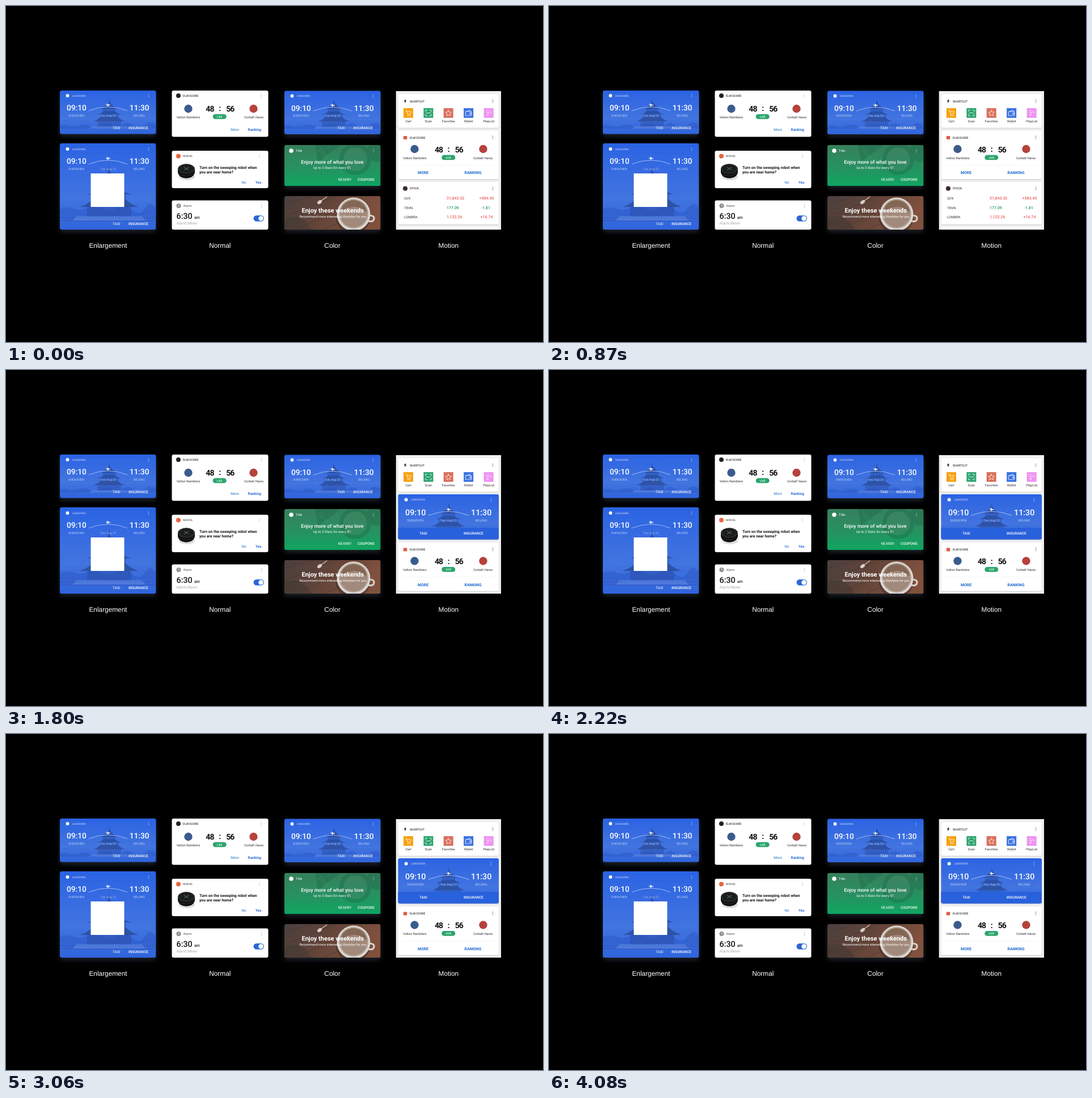
An HTML page for the animation above (4.29 s loop, 947x592 px).

```html
<!DOCTYPE html>
<html lang="en">
<head>
<meta charset="utf-8">
<title>Card styles</title>
<style>
html, body { margin: 0; width: 100%; height: 100%; overflow: hidden; background: #000; }
svg { display: block; width: 947px; height: 592px; text-rendering: geometricPrecision; }
text { font-family: Roboto, Arial, sans-serif; font-size: 5.7px; fill: #333; }
.w text, text.w { fill: #fff; }
.m { text-anchor: middle; }
.e { text-anchor: end; }
.med { font-weight: 500; }
text.b { font-weight: 700; }
text.head { font-size: 5.1px; font-weight: 500; }
text.time { font-size: 13.7px; font-weight: 500; }
text.btn { font-size: 6.4px; }
text.link { font-size: 6.4px; fill: #2a6cd6; }
text.big { font-size: 6.9px; font-weight: 700; fill: #1f6bd0; }
text.num { font-size: 7px; font-weight: 500; }
text.up { fill: #ea5f5a; }
text.down { fill: #2a9d63; }
text.score { font-size: 14px; font-weight: 700; letter-spacing: -1px; fill: #111; }
text.cap { font: 11.85px "Liberation Sans", Arial, sans-serif; fill: #fff; }
text.soft { font-size: 5.4px; fill: #b9cdfa; }
.line { fill: none; stroke: #fff; stroke-width: .8; stroke-linejoin: round; stroke-linecap: round; }
.card { fill: #fff; }
</style>
</head>
<body>
<svg viewBox="0 0 947 592">
<defs>
  <linearGradient id="green" x2="0" y2="1">
    <stop offset="0" stop-color="#35805c"/><stop offset=".5" stop-color="#2a8f61"/><stop offset="1" stop-color="#0fa560"/>
  </linearGradient>
  <linearGradient id="wood" x2="1" y2=".25">
    <stop offset="0" stop-color="#4b403d"/><stop offset=".5" stop-color="#634439"/><stop offset="1" stop-color="#80513e"/>
  </linearGradient>
  <linearGradient id="sky" x2="0" y2="1">
    <stop offset="0" stop-color="#2b63e3"/><stop offset=".65" stop-color="#4274df"/><stop offset="1" stop-color="#2f64dc"/>
  </linearGradient>
  <filter id="glow" x="-10%" y="-10%" width="120%" height="130%">
    <feDropShadow dx="0" dy="4" stdDeviation="4" flood-color="#343a48" flood-opacity=".6"/>
  </filter>
  <filter id="lift" x="-10%" y="-10%" width="120%" height="130%">
    <feDropShadow dx="0" dy="1" stdDeviation="1.3" flood-color="#445" flood-opacity=".25"/>
  </filter>
  <filter id="smear" x="-5%" y="-10%" width="110%" height="120%">
    <feGaussianBlur id="smearBlur" stdDeviation="0"/>
  </filter>
  <clipPath id="panel"><rect x="687.5" y="150" width="185.5" height="244"/></clipPath>
  <clipPath id="coffeeClip"><rect x="491" y="335" width="169.5" height="59" rx="3"/></clipPath>
  <clipPath id="greenClip"><rect x="491" y="245" width="169.5" height="72" rx="3"/></clipPath>
  <clipPath id="tallClip"><rect width="169.5" height="152" rx="3"/></clipPath>

  <g id="dots"><circle cy="-2.4" r=".7"/><circle r=".7"/><circle cy="2.4" r=".7"/></g>

  <g id="temple">
    <path d="M52 67l4-4h62l4 4z" fill="#8ba8ec" opacity=".3"/>
    <path d="M76 32h22v4H76zM71 42h32v4H71zM66 54h42v9H66z" fill="#27489b" opacity=".4"/>
    <path d="M87 15l1 6 3 3q3 5 11 8H72q8-3 11-8l3-3zM77 36h20q3 4 11 6H66q8-2 11-6zM72 46h30q4 5 13 8H59q9-3 13-8z" fill="#233f86" opacity=".62"/>
  </g>

  <g id="trip" class="w">
    <circle cx="13.5" cy="9" r="2.9" fill="#fff"/>
    <text x="22" y="10.8" style="font-size:4.6px" opacity=".8">LUNADORA</text>
    <use href="#dots" x="156.5" y="9" fill="#b9cdfa"/>
    <path d="M51 35.5Q85 22 119 35.5" fill="none" stroke="#b9cdfa" stroke-width=".8"/>
    <path d="M81 25.300l.3-1.300 1.200.8h1.500l-.6-2.300h.8l1.700 2.300h1.800q1.300.2 1.300.8t-1.300.7h-1.800l-1.700 2.200h-.8l.6-2.200z" fill="#fff"/>
    <text x="12" y="35.2" class="time">09:10</text>
    <text x="157.5" y="35.2" class="time e">11:30</text>
    <text x="15" y="45.6" class="soft">SHENZHEN</text>
    <text x="85" y="45.6" class="soft m" opacity=".75">Tue, Aug 22</text>
    <text x="150" y="45.6" class="soft e">BEIJING</text>
  </g>
  <g id="tripButtons" class="w">
    <text x="93" class="btn">TAXI</text>
    <text x="121" class="btn med">INSURANCE</text>
  </g>
  <path id="trees" fill="#2a58c0" opacity=".45" d="M0 62q8-3 16 0t18-1 18 1 20-1 20 1 18-1 20 1 20-1 19.500 0v6H0z"/>
  <g id="tripCard">
    <rect width="169.5" height="76.5" rx="3" fill="url(#sky)"/>
    <use href="#trees"/>
    <use href="#temple"/>
    <use href="#trip"/>
    <use href="#tripButtons" y="67.600"/>
  </g>

  <g id="result">
    <text x="-17.300" y="4.900" class="score m">48</text>
    <text y="4" class="score m">:</text>
    <text x="18.500" y="4.900" class="score m">56</text>
    <rect x="-12" y="9.500" width="24" height="8.800" rx="4.400" fill="#2ba56b"/>
    <text y="15.600" class="w m med" style="font-size:4.800px">LIVE</text>
  </g>
  <circle id="home" r="7.200" fill="#3b5b8c"/>
  <circle id="away" r="7.200" fill="#b5423b"/>
</defs>

<!-- Enlargement -->
<g transform="translate(95 149)" filter="url(#glow)"><use href="#tripCard"/></g>
<g transform="translate(95 242)" filter="url(#glow)">
  <g clip-path="url(#tallClip)">
    <rect width="169.5" height="152" fill="url(#sky)"/>
    <path d="M0 116q12-6 24-1t26-2 26 2 24-2 26 3 24-2 20 2v22H0z" fill="#2a58c0" opacity=".45"/>
    <use href="#temple" transform="translate(-74 12) scale(1.85)"/>
    <path d="M0 128h170M0 134h170" stroke="#7f9fe8" stroke-width=".7" stroke-dasharray="2 3" opacity=".6"/>
  </g>
  <use href="#trip" y="1"/>
  <rect x="54.500" y="53" width="59" height="59" fill="#fff"/>
  <use href="#tripButtons" y="143.700"/>
</g>

<!-- Normal -->
<rect class="card" x="292.5" y="149" width="170" height="81.5" rx="3"/>
<circle cx="304" cy="158" r="4" fill="#222"/>
<text x="312" y="159.800" class="head">ELM SCORE</text>
<use href="#dots" x="450.5" y="158" fill="#aaa"/>
<use href="#home" x="321.5" y="181"/>
<use href="#away" x="436.5" y="181"/>
<use href="#result" x="376.7" y="181"/>
<text x="321.500" y="197.500" class="m">Velton Ramblers</text>
<text x="437" y="197.500" class="m">Corbell Hares</text>
<text x="403.500" y="220.300" class="link m">More</text>
<text x="450" y="220.300" class="link b e">Ranking</text>

<rect class="card" x="292.5" y="255" width="170" height="66" rx="3"/>
<circle cx="304" cy="264.500" r="4" fill="#e8663c"/>
<text x="312" y="266.300" style="font-size:4.700px">NORVEL</text>
<use href="#dots" x="447" y="264.5" fill="#aaa"/>
<ellipse cx="319" cy="301" rx="14" ry="6" fill="#ddd"/>
<path d="M303 287v6c2 14 28 14 30 0v-6z" fill="#0e0e0e"/>
<ellipse cx="318" cy="287" rx="15" ry="9" fill="#29292a"/>
<ellipse cx="318" cy="286.500" rx="12" ry="7" fill="#1b1c1d"/>
<path d="M314 284l8 5m0-5l-8 5" stroke="#4e857b" stroke-width=".9"/>
<path d="M304 294q14 11 28 0" fill="none" stroke="#444" stroke-width=".6"/>
<g style="font-weight:700">
  <text x="341" y="287.300" style="font-size:6.800px;fill:#111">Turn on the sweeping robot when</text>
  <text x="341" y="295.300" style="font-size:6.800px;fill:#111">you are near home?</text>
</g>
<text x="419.500" y="313" class="link m">No</text>
<text x="450.500" y="313" class="link b e">Yes</text>

<rect class="card" x="292.5" y="342.500" width="170" height="51.500" rx="3"/>
<circle cx="304.500" cy="352" r="4" fill="#8b8b90"/>
<path d="M304.500 349.500v2.700l1.700 1" class="line"/>
<text x="312.500" y="354" style="fill:#555">Alarm</text>
<use href="#dots" x="450.5" y="352" fill="#aaa"/>
<text x="300.500" y="375.300" style="font-size:14.300px;font-weight:500;fill:#111">6:30</text>
<text x="332" y="375.300" style="font-size:7px;font-weight:500;fill:#222">am</text>
<text x="300.500" y="384.600" style="font-size:6.800px;fill:#a9a9a9">Alarm,Never</text>
<rect x="436.500" y="369" width="18.500" height="10.500" rx="5.250" fill="#2e66d8"/>
<circle cx="449.600" cy="374.250" r="4.300" fill="#fff"/>

<!-- Color -->
<g transform="translate(491 149.500)" filter="url(#glow)"><use href="#tripCard"/></g>

<g filter="url(#glow)">
  <g clip-path="url(#greenClip)">
    <rect x="491" y="245" width="169.5" height="72" fill="url(#green)"/>
    <g fill="#1c5f42" opacity=".3">
      <circle cx="616" cy="270" r="28"/><circle cx="653" cy="257" r="17"/><path d="M545 245h45l-40 30z"/>
    </g>
    <circle cx="616" cy="270" r="21" fill="#57a37d" opacity=".3"/>
    <path d="M551 253l16 18M554 249l14 18" stroke="#6ab893" opacity=".35"/>
  </g>
</g>
<g class="w">
  <circle cx="503" cy="255" r="3.800" fill="#fff"/>
  <text x="511" y="257" style="font-size:5.900px">Title</text>
  <use href="#dots" x="648" y="255" fill="#b4dcc7"/>
  <text x="575.300" y="277.500" class="m med" style="font-size:8.800px">Enjoy more of what you love</text>
  <text x="575" y="286.600" class="m" style="font-size:5.950px">Up to 3 Stars for every $1</text>
  <text x="585.500" y="307.800" class="btn">NEARBY</text>
  <text x="620" y="307.800" class="btn med">COUPONS</text>
</g>

<g filter="url(#glow)">
  <g clip-path="url(#coffeeClip)">
    <rect x="491" y="335" width="169.5" height="59" fill="url(#wood)"/>
    <path d="M491 350l50-15M491 371l90-36M512 394l70-33M560 394l40-18" stroke="#302927" stroke-width="1" opacity=".35"/>
    <path d="M491 374q30-12 48 20h-48z" fill="#39322f" opacity=".4"/>
    <path d="M566 336l-11 8" stroke="#cfc4bb" stroke-width="1.300"/>
    <ellipse cx="553" cy="345.500" rx="4.600" ry="2.900" fill="#d8cec6" transform="rotate(-38 553 345.500)"/>
    <circle cx="612" cy="371" r="31" fill="#3d2c26" opacity=".5"/>
    <path d="M640 369q10 0 9 6t-10 4" fill="none" stroke="#d8d1cc" stroke-width="3"/>
    <circle cx="613" cy="367" r="29.500" fill="#dcd6d1"/>
    <circle cx="613" cy="366" r="26" fill="#b5a598"/>
    <circle cx="613" cy="366" r="24" fill="#a18a7b"/>
    <path d="M590 364a23 22 0 0 1 46 0q-10-11-23-10t-23 10z" fill="#846655"/>
  </g>
</g>
<g class="w m">
  <text x="576.200" y="363.600" class="b" style="font-size:11px">Enjoy these weekends</text>
  <text x="576.500" y="372.800" style="font-size:5.700px">Recommend more interesting lifestyles for you</text>
</g>

<!-- Motion -->
<g clip-path="url(#panel)">
  <rect x="687.500" y="150" width="185.500" height="244" fill="#f1f1f2"/>
  <g filter="url(#lift)"><rect class="card" x="691.5" y="155" width="177.5" height="59.500" rx="3"/></g>
  <path d="M704.800 163.500l-3 4.600h1.900l-.6 3.500 3.200-4.800h-2z" fill="#111"/>
  <text x="712" y="169.500" class="head">SHORTCUT</text>
  <use href="#dots" x="858.5" y="167.5" fill="#555"/>
  <g transform="translate(709.5 188.500)">
    <rect x="-8.500" y="-8.500" width="17" height="17" fill="#f8a010"/>
    <path class="line" d="M-5-4.500h2l2 6.500h4l2-4.500h-7"/><circle cx="-.5" cy="4.500" r=".9" fill="#fff"/><circle cx="3" cy="4.500" r=".9" fill="#fff"/>
    <text y="16.500" class="m">Cart</text>
  </g>
  <g transform="translate(744.900 188.500)">
    <rect x="-8.500" y="-8.500" width="17" height="17" fill="#2da36f"/>
    <path class="line" d="M-5-2v-3h3M2-5h3v3M5 2v3h-3M-2 5h-3v-3M-3.500 0h7"/>
    <text y="16.500" class="m">Scan</text>
  </g>
  <g transform="translate(780.200 188.500)">
    <rect x="-8.500" y="-8.500" width="17" height="17" fill="#d9705c"/>
    <path class="line" d="M0-5l1.500 3.300 3.700.4-2.700 2.500.7 3.600-3.200-1.800-3.200 1.800.7-3.600-2.700-2.500 3.700-.4z"/>
    <text y="16.500" class="m">Favorites</text>
  </g>
  <g transform="translate(815.700 188.500)">
    <rect x="-8.500" y="-8.500" width="17" height="17" fill="#3972e2"/>
    <path class="line" d="M-5-2.500h10v7h-10zM-3.500-2.500l6-2.500 1 2.500M5 0h-3v2h3"/>
    <text y="16.500" class="m">Wallet</text>
  </g>
  <g transform="translate(851.200 188.500)">
    <rect x="-8.500" y="-8.500" width="17" height="17" fill="#ee93f1"/>
    <path class="line" opacity=".7" d="M-5-4h6M-5-1h4M-1 3.500v-4l5-2v4"/><circle cx="-2.300" cy="3.500" r="1.300" class="line" opacity=".7"/>
    <text y="16.500" class="m">PlayList</text>
  </g>

  <g id="list">
    <g filter="url(#lift)">
      <rect class="card" x="691.5" y="219.500" width="177.5" height="85.500" rx="3"/>
      <rect class="card" x="691.5" y="309.500" width="177.5" height="75" rx="3"/>
      <rect class="card" x="691.5" y="389" width="177.5" height="60" rx="3"/>
    </g>
    <rect x="700.800" y="229" width="6.500" height="6" rx="1" fill="#dc5f49"/>
    <text x="712" y="233.700" class="head">ELM SCORE</text>
    <use href="#dots" x="858.5" y="231.700" fill="#555"/>
    <use href="#home" x="720.500" y="252"/>
    <use href="#away" x="841.500" y="252"/>
    <use href="#result" x="780.300" y="253"/>
    <text x="721" y="269.700" class="m">Velton Ramblers</text>
    <text x="841" y="269.700" class="m">Corbell Hares</text>
    <path d="M698 280.500h164" stroke="#efefef" stroke-width=".7"/>
    <text x="735.500" y="296" class="big m">MORE</text>
    <text x="823.500" y="296" class="big m">RANKING</text>

    <circle cx="704" cy="321.500" r="4" fill="#3a2a2c"/>
    <text x="712" y="323.400" class="head">STOCK</text>
    <use href="#dots" x="858.5" y="321.500" fill="#555"/>
    <text x="702" y="340.600" style="font-size:6px">QVX</text>
    <text x="777" y="340.600" class="num up">31,843.32</text>
    <text x="847.500" y="340.600" class="num up m">+584.45</text>
    <text x="702" y="357.500" style="font-size:6px">TRVN</text>
    <text x="777" y="357.500" class="num down">177.09</text>
    <text x="846" y="357.500" class="num down m">-1.81</text>
    <text x="702" y="374.200" style="font-size:6px">LOMBRA</text>
    <text x="777" y="374.200" class="num up">1,122.26</text>
    <text x="847.500" y="374.200" class="num up m">+16.74</text>
  </g>

  <g id="arrival" opacity="0">
    <g transform="translate(691.5 219)">
      <g filter="url(#lift)"><rect width="177.500" height="79.500" rx="3" fill="url(#sky)"/></g>
      <g transform="scale(1.047)">
        <use href="#temple" x="-2"/>
        <use href="#trip"/>
      </g>
      <path d="M0 59h177.500v17.500a3 3 0 0 1-3 3H3a3 3 0 0 1-3-3z" fill="#2861dc"/>
      <text x="44.500" y="71.300" class="btn med w m">TAXI</text>
      <text x="133" y="71.300" class="btn med w m">INSURANCE</text>
    </g>
  </g>
</g>

<g class="m">
  <text x="180" y="426.300" class="cap">Enlargement</text>
  <text x="377.300" y="426.300" class="cap">Normal</text>
  <text x="575.500" y="426.300" class="cap">Color</text>
  <text x="780.300" y="426.300" class="cap">Motion</text>
</g>
</svg>

<script>
const LOOP = 4290, STEP = 30, DROP = 84.5;
const list = document.getElementById('list');
const arrival = document.getElementById('arrival');
const blur = document.getElementById('smearBlur');

const progress = (t, start, end) => Math.min(1, Math.max(0, (t - start) / (end - start)));
const easeInOut = p => p < .5 ? 4 * p ** 3 : 1 - 4 * (1 - p) ** 3;
const drop = t => DROP * easeInOut(progress(t, 990, 1390));

function draw(t) {
  const y = drop(t);
  const speed = y - drop(t - STEP);
  list.setAttribute('transform', `translate(0 ${y})`);
  if (speed > .3) {
    blur.setAttribute('stdDeviation', `0.1 ${Math.min(speed / 9, 2)}`);
    list.setAttribute('filter', 'url(#smear)');
  } else {
    list.removeAttribute('filter');
  }

  const grow = progress(t, 1080, 1420);
  const scale = .8 + .2 * easeInOut(grow);
  arrival.setAttribute('opacity', Math.min(1, grow * 1.6));
  arrival.setAttribute('transform', `translate(780.25 208) scale(${scale}) translate(-780.25 -208)`);
}

function tick() {
  const t = performance.now() % LOOP;
  draw(Math.floor(t / STEP) * STEP);
  requestAnimationFrame(tick);
}
tick();
</script>
</body>
</html>
```
